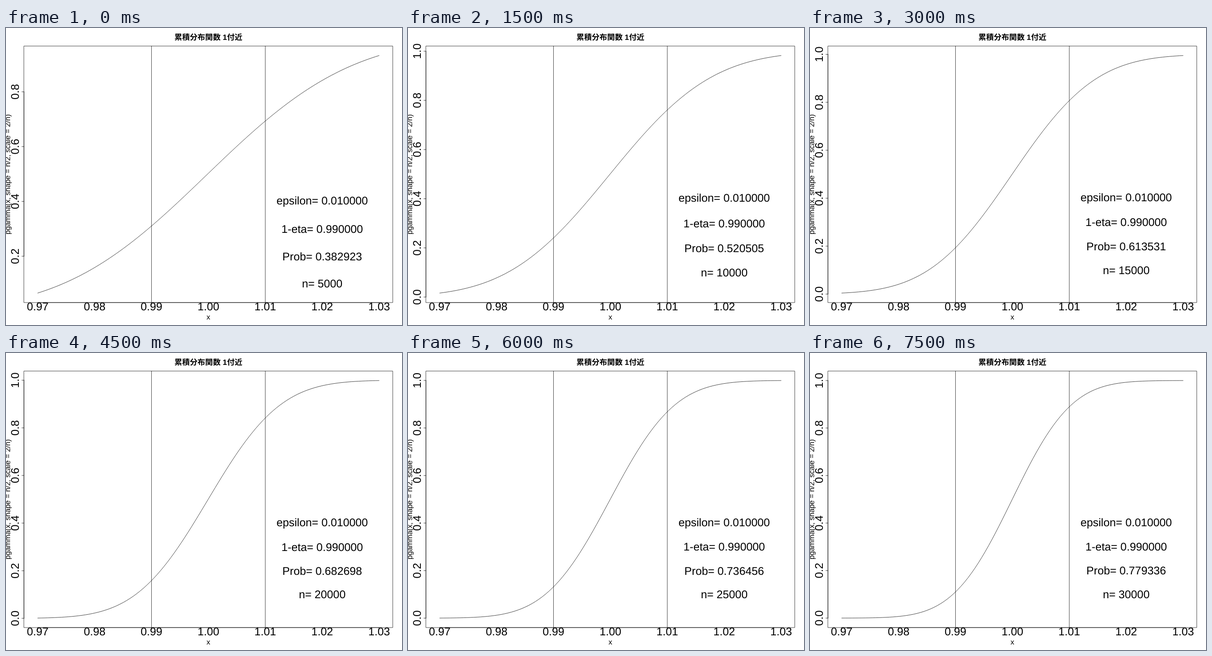
Write an HTML page that moves like this. It is 864 by 648 pixels and loops after 8 s.

```html
<!DOCTYPE html>
<html lang="ja">
<head>
<meta charset="utf-8">
<style>
html, body { margin: 0; width: 100%; height: 100%; overflow: hidden; background: #fff; }
svg { display: block; width: 100vw; height: 100vh; }
path { fill: none; stroke: #000; stroke-width: .75; stroke-linecap: round; stroke-linejoin: round; }
text {
  font: 24.3px "Liberation Sans", "Noto Sans CJK JP", "Noto Sans CJK", sans-serif;
  text-anchor: middle; text-rendering: geometricPrecision; white-space: pre;
}
.label { font-size: 16.1px; }
.title { font-size: 16.8px; font-weight: bold; }
</style>
</head>
<body>
<svg viewBox="0 0 864 648"><g id="fixed"></g><g id="plot"></g></svg>
<script>
const LOOP = 8000, STEP = 1500;
const PROBS = ["0.382923", "0.520505", "0.613531", "0.682698", "0.736456", "0.779336"];

// Margins are counted in text lines
const LINE = 9.6, TICK = LINE / 2;
const L = 4.1 * LINE, T = 4.1 * LINE, R = 864 - 2.1 * LINE, B = 648 - 5.1 * LINE;
const X0 = 0.97, X1 = 1.03, PAD = 0.04 / 1.08;

const lerp = (a, b, u) => a + (b - a) * u;
const px = x => lerp(L, R, PAD + (x - X0) / (X1 - X0) / 1.08);
const path = d => `<path d="${d}"/>`;
const label = (s, x, y, cls = "") => `<text class="${cls}" x="${x}" y="${y}">${s}</text>`;
const upright = (s, x, y, cls = "") =>
  `<text class="${cls}" transform="translate(${x} ${y}) rotate(-90)">${s}</text>`;

// Standard normal distribution function
function phi(z) {
  const a = Math.abs(z) / Math.SQRT2, k = 1 / (1 + 0.3275911 * a);
  const poly = [1.061405429, -1.453152027, 1.421413741, -0.284496736, 0.254829592]
    .reduce((s, c) => (s + c) * k, 0);
  const tail = poly * Math.exp(-a * a) / 2;
  return z < 0 ? tail : 1 - tail;
}

// Gamma CDF, shape n/2 and scale 2/n (cube-root approximation)
function pgamma(x, n) {
  const v = 2 / (9 * n);
  return phi((Math.cbrt(x) - 1 + v) / Math.sqrt(v));
}

function drawFixed() {
  let out = path(`M${L} ${T}H${R}V${B}H${L}Z`) + path(`M${px(X0)} ${B}H${px(X1)}`);
  for (let i = 0; i <= 6; i++) {
    const v = X0 + i / 100, x = px(v);
    out += path(`M${x} ${B}v${TICK}`) + label(v.toFixed(2), x, B + 1.8 * LINE);
  }
  for (const v of [0.99, 1.01]) out += path(`M${px(v)} ${B}V${T}`);
  const mid = (L + R) / 2;
  out += label("累積分布関数 1付近", mid, 26.3, "title");
  out += label("x", mid, B + 3.8 * LINE, "label");
  out += upright("pgamma(x, shape = n/2, scale = 2/n)", L - 3.2 * LINE, (T + B) / 2, "label");
  document.getElementById("fixed").innerHTML = out;
}

function drawPlot(step) {
  const n = 5000 * (step + 1);
  const lo = pgamma(X0, n), hi = pgamma(X1, n);
  const py = p => lerp(B, T, PAD + (p - lo) / (hi - lo) / 1.08);

  const pts = Array.from({ length: 101 }, (_, i) => {
    const x = lerp(X0, X1, i / 100);
    return `${px(x).toFixed(2)} ${py(pgamma(x, n)).toFixed(2)}`;
  });
  let out = path("M" + pts.join("L"));

  const ticks = [0, 0.2, 0.4, 0.6, 0.8, 1].filter(p => py(p) >= T && py(p) <= B);
  out += path(`M${L} ${py(ticks[0])}V${py(ticks[ticks.length - 1])}`);
  for (const p of ticks) {
    out += path(`M${L} ${py(p)}h${-TICK}`) + upright(p.toFixed(1), L - 1.2 * LINE, py(p));
  }

  const x = px(1.02);
  out += label("epsilon= 0.010000", x, py(0.4) + 6.5);
  out += label("1-eta= 0.990000", x, py(0.3) + 8.5);
  out += label("Prob= " + PROBS[step], x, py(0.2) + 8.8);
  out += label("n= " + n, x, py(0.1) + 8.5);
  document.getElementById("plot").innerHTML = out;
}

let shown = -1;
const start = performance.now();
function tick() {
  const step = Math.floor((performance.now() - start) % LOOP / STEP);
  if (step !== shown) drawPlot(shown = step);
  requestAnimationFrame(tick);
}
drawFixed();
tick();
</script>
</body>
</html>
```
